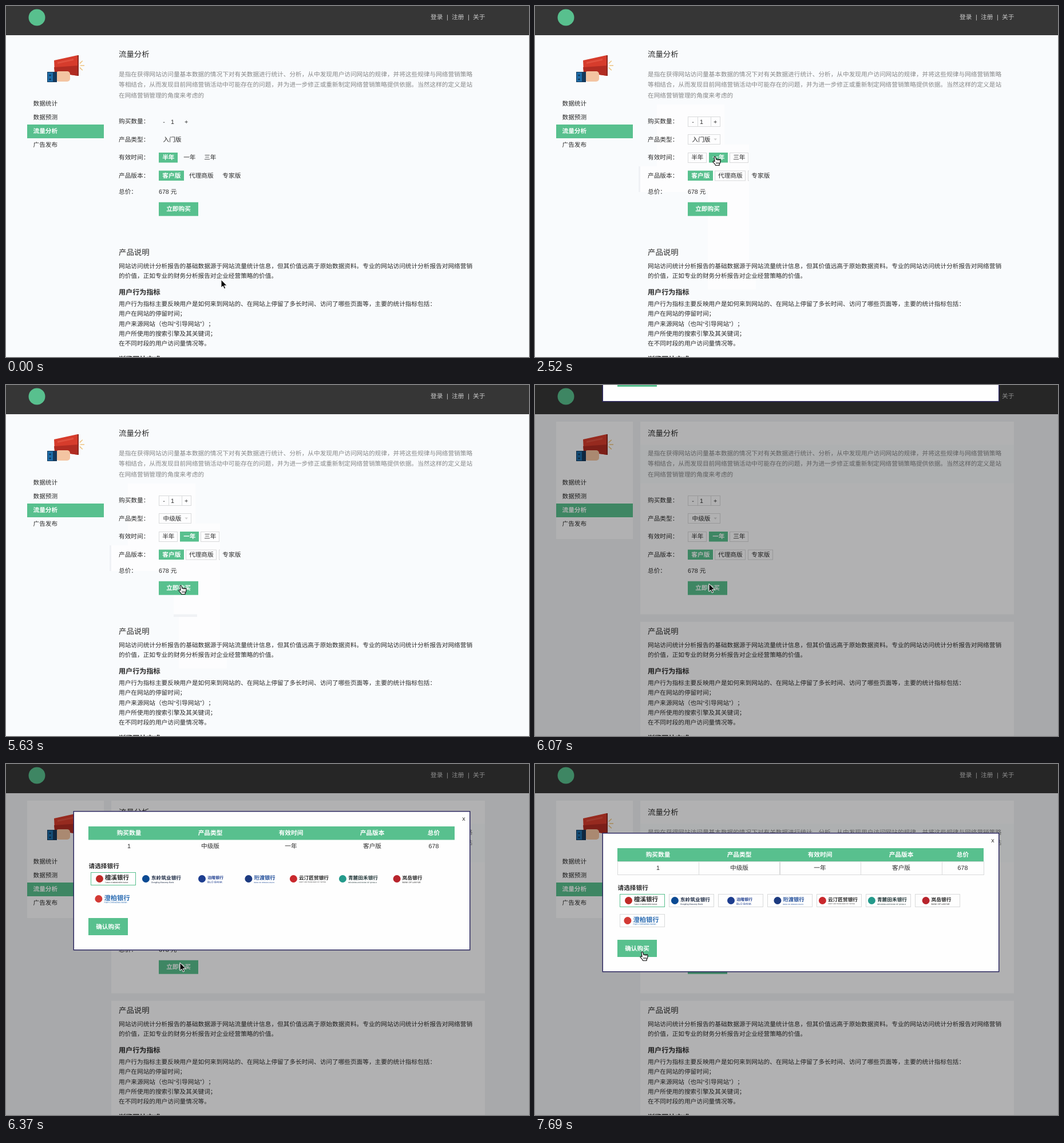
These frames come from a looping animation (914 by 613 pixels, 7.99 s). An HTML page with a canvas:

```html
<!DOCTYPE html>
<html lang="zh-CN">
<head>
<meta charset="utf-8">
<title>流量分析</title>
<style>
html, body { margin: 0; width: 100%; height: 100%; overflow: hidden; background: #f9fbfd; }
canvas { display: block; width: 914px; height: 613px; }
</style>
</head>
<body>
<canvas id="stage" width="914" height="613"></canvas>
<script>
const ctx = document.getElementById('stage').getContext('2d');
const W = 914, H = 613, LOOP = 7990, STEP = 147.9;
const FONT = '"Liberation Sans", "Noto Sans CJK SC", "Noto Sans CJK", sans-serif';
const GREEN = '#58c08e', INK = '#2b2b2b', LINE = '#d9dadb', CARD = '#fdfdfe', FLAT = '#f9fbfd';
const EM = 10.667, TITLE = 13.4, LEFT = 197, FIELD = 267;
ctx.textRendering = 'geometricPrecision';

// ---------- helpers ----------
// Sets glyphs one by one so that full-width punctuation keeps its full em.
function text(str, x, y, { size = EM, color = INK, bold = false, center = false } = {}) {
  ctx.font = `${bold ? 'bold ' : ''}${size}px ${FONT}`;
  ctx.fillStyle = color;
  const glyphs = [...str], widths = glyphs.map(g => ctx.measureText(g).width);
  if (center) x -= widths.reduce((a, b) => a + b, 0) / 2;
  glyphs.forEach((g, i) => {
    ctx.fillText(g, x, y + size * 0.38);
    x += widths[i];
  });
}

const block = (lines, y, gap, style) => lines.forEach((s, i) => text(s, LEFT, y + i * gap, style));

function rect(x, y, w, h, color) {
  ctx.fillStyle = color;
  ctx.fillRect(x, y, w, h);
}

function frame(x, y, w, h, color = LINE) {
  ctx.strokeStyle = color;
  ctx.lineWidth = 1;
  ctx.strokeRect(x + 0.5, y + 0.5, w - 1, h - 1);
}

function button(label, x, y, w, h) {
  rect(x, y, w, h, GREEN);
  text(label, x + w / 2, y + h / 2 - 0.5, { center: true, bold: true, color: '#fff' });
}

function poly(points, fill, stroke) {
  ctx.beginPath();
  points.forEach(([x, y]) => ctx.lineTo(x, y));
  ctx.closePath();
  ctx.fillStyle = fill;
  ctx.fill();
  if (stroke) { ctx.strokeStyle = stroke; ctx.lineWidth = 1; ctx.stroke(); }
}

function disc(x, y, r, color) {
  ctx.fillStyle = color;
  ctx.beginPath();
  ctx.arc(x, y, r, 0, Math.PI * 2);
  ctx.fill();
}

// ---------- page ----------
const INTRO = [
  '是指在获得网站访问量基本数据的情况下对有关数据进行统计、分析，从中发现用户访问网站的规律，并将这些规律与网络营销策略',
  '等相结合，从而发现目前网络营销活动中可能存在的问题，并为进一步修正或重新制定网络营销策略提供依据。当然这样的定义是站',
  '在网络营销管理的角度来考虑的'
];
const ABOUT = [
  '网站访问统计分析报告的基础数据源于网站流量统计信息，但其价值远高于原始数据资料。专业的网站访问统计分析报告对网络营销',
  '的价值，正如专业的财务分析报告对企业经营策略的价值。'
];
const METRICS = [
  '用户行为指标主要反映用户是如何来到网站的、在网站上停留了多长时间、访问了哪些页面等，主要的统计指标包括：',
  '用户在网站的停留时间；',
  '用户来源网站（也叫“引导网站”）；',
  '用户所使用的搜索引擎及其关键词；',
  '在不同时段的用户访问量情况等。'
];
const LABELS = ['购买数量：', '产品类型：', '有效时间：', '产品版本：'];
const MENU = ['数据统计', '数据预测', '流量分析', '广告发布'];
const YEARS = ['半年', '一年', '三年'];
const EDITIONS = ['客户版', '代理商版', '专家版'];
const TYPES = ['入门版', '中级版', '高级版'];

function megaphone() {
  poly([[84, 95], [125, 86], [126, 122], [85, 116]], '#d63c2c');
  poly([[84, 107], [126, 104], [126, 122], [85, 116]], '#b12c22');
  poly([[90, 98], [118, 92], [118, 95], [90, 101]], '#e0503f');
  rect(125, 86, 2, 36, '#8f2a22');
  ctx.strokeStyle = '#eec27c';
  ctx.lineWidth = 1.5;
  ctx.beginPath();
  for (const a of [-0.75, 0, 0.75]) {
    ctx.moveTo(125 + 5 * Math.cos(a), 104 + 5 * Math.sin(a));
    ctx.lineTo(125 + 12 * Math.cos(a), 104 + 12 * Math.sin(a));
  }
  ctx.stroke();
  ctx.fillStyle = '#f3c4a2';
  ctx.beginPath();
  ctx.roundRect(87, 114, 25, 18, 5);
  ctx.fill();
  rect(72, 115, 17, 18, '#15395c');
  rect(73, 116, 9, 16, '#1d6ca8');
  disc(77, 121, 1.6, '#123350');
  disc(77, 128, 1.6, '#123350');
}

function chips(labels, y, active, crisp) {
  let left = FIELD;
  labels.forEach((label, i) => {
    const w = Math.round(label.length * EM + 11.7), x = Math.round(left), on = i === active;
    if (on) rect(x, y, w, 17.5, GREEN);
    else if (crisp) frame(x, y, w, 18);
    text(label, x + w / 2 + 0.3, y + 8.3, { center: true, bold: on, color: on ? '#fff' : INK });
    left += label.length * EM + 15.4;
  });
}

function cards(split) {
  rect(0, 0, W, H, '#f0f2f5');
  rect(37, 64, 134, 205, CARD);
  rect(184, 64, 653, H, CARD);
  rect(184, 104, 653, 68, FLAT);
  if (split) rect(184, 400.5, 653, 13, '#f0f2f5');
}

// crisp: cards and borders show; split: the gap between the two cards shows as well
function page(year, type, crisp, split) {
  if (crisp) cards(split);
  else rect(0, 0, W, H, FLAT);
  rect(0, 0, W, 51, '#363636');
  disc(54, 20, 14.5, GREEN);
  ['登录', '注册', '关于'].forEach((s, i) => {
    text(s, 742 + i * 37, 19, { color: '#cecece' });
    if (i) text('|', 733 + i * 37, 19, { color: '#cecece' });
  });

  megaphone();
  MENU.forEach((item, i) => {
    const on = i === 2;
    if (on) rect(37, 207, 134, 24, GREEN);
    text(item, 47.5, 170.3 + i * 24, { bold: on, color: on ? '#fff' : INK });
  });

  text('流量分析', LEFT, 84, { size: TITLE });
  block(INTRO, 118.7, 18.7, { color: '#868788' });
  block(LABELS, 200.7, 31.8);
  if (crisp) {
    frame(FIELD, 193, 57, 18);
    frame(284, 193, 24, 18);
    frame(FIELD, 224, 57, 18);
    poly([[312.5, 231.5], [318, 231.5], [315.2, 234.8]], '#d0d0d0');
  }
  text('-', 276, 202, { center: true });
  text('1', 291, 202, { center: true });
  text('+', 315, 202, { center: true });
  text(TYPES[type], 274.5, 232.7);
  chips(YEARS, 256, year, crisp);
  chips(EDITIONS, 287.5, 0, crisp);
  text('总价：', LEFT, 323.5);
  text('678 元', FIELD, 323.5);
  button('立即购买', FIELD, 342.7, 69, 24);

  text('产品说明', LEFT, 430, { size: TITLE });
  block(ABOUT, 454, 17.3);
  block(['用户行为指标', '浏览网站方式'], 499, 117, { size: 12.1, bold: true });
  block(METRICS, 520, 17.35);
}

function dropdown(hover) {
  rect(FIELD, 241, 57, 54, CARD);
  TYPES.forEach((s, i) => {
    const y = 242 + i * 17.3;
    if (i === hover) rect(FIELD + 1, y, 55, 17.3, '#e3e3e3');
    text(s, 274.5, y + 8.3);
  });
  frame(FIELD, 241, 57, 54);
}

// ---------- dialog ----------
const ORDER = [['购买数量', '1'], ['产品类型', '中级版'], ['有效时间', '一年'], ['产品版本', '客户版'], ['总价', '678']];
const BANKS = [ // name, name size, caption, mark colour, ink
  ['檀溪银行', 10.5, 'TANXI COMMONERS BANK', '#bf2a26', '#222'],
  ['东岭筑业银行', 8.7, 'Dongling Masonry Bank', '#0b4a93', '#1c2a44'],
  ['泊隆银行', 7, 'BLO BANK', '#1d3d8f', '#1d3d8f'],
  ['珩渡银行', 9.3, 'BANK OF HENGDUVALES', '#1c3a80', '#1c4a98'],
  ['云汀匠贸银行', 8.7, 'CRAFT AND TRADE BANK OF YUNTING', '#c9282d', '#222'],
  ['青麓田禾银行', 8.7, 'MEADOWLAND BANK OF QINGLU', '#249a8b', '#24383a'],
  ['岚岳银行', 8.7, 'BANK OF LANYUE', '#b8242c', '#222'],
  ['澄柏银行', 11.3, 'FAIR CHENGBAI BANK', '#d33a35', '#2c6db3']
];

function bank([name, size, caption, mark, ink], i, lines) {
  const x = 148 + (i % 7) * 86, y = 107 + Math.floor(i / 7) * 35;
  const width = name.length * size, left = x + 38 - (width + 16) / 2;
  if (lines || !i) frame(x, y, 79, 23, i ? LINE : GREEN);
  disc(left + 6.5, y + 11.5, 6.5, mark);
  text(name, left + 16, y + 9.5, { size, bold: true, color: ink });
  text(caption, left + 16, y + 17.5, { size: 1.5 * width / caption.length, color: ink });
}

function dialog(top, lines) {
  ctx.save();
  ctx.translate(0, top);
  rect(117.5, 0, 694, 243.5, '#2f2a62');
  rect(119, 1.5, 691, 240.5, '#fefefe');
  text('x', 800, 12.5, { center: true });
  rect(144, 27, 640, 23.5, GREEN);
  ORDER.forEach(([head, value], i) => {
    const a = Math.round(144 + i * 141.7), b = Math.min(784, Math.round(a + 141.7)), mid = (a + b) / 2;
    text(head, mid, 38, { center: true, bold: true, color: '#fff' });
    text(value, mid, 61.3, { center: true });
    if (lines) frame(a, 50, b - a + 1, 24);
  });
  text('请选择银行', 144.5, 95.7, { bold: true });
  BANKS.forEach((b, i) => bank(b, i, lines));
  button('确认购买', 144, 187, 69, 30);
  ctx.restore();
}

// ---------- pointer ----------
const START = [376, 478];
const MOVES = [ // first step, last step, stops on the way
  [2, 10, [364, 478], [302, 242], [321, 308], [213, 154], [213, 280], [181, 308]],
  [10, 14, [184, 283], [338, 280], [310, 262]],
  [19, 24, [302, 229], [296, 237]],
  [26, 30, [293, 266]],
  [33, 38, [324, 388], [301, 349]],
  [40, 41, [304, 347]],
  [46, 52, [183, 327]]
];
const ARROW = [[0, 0], [0, 14], [3.2, 11], [5.4, 16], [7.7, 15], [5.5, 10.3], [10, 10.3]];

const legs = [];
let last = START;
for (const [from, to, ...stops] of MOVES) {
  const span = (to - from) / stops.length;
  stops.forEach((stop, i) => {
    legs.push({ start: from + i * span, span, a: last, b: stop });
    last = stop;
  });
}

function locate(k) {
  const leg = legs.filter(l => l.start <= k).pop();
  if (!leg) return START;
  const u = Math.min(1, (k - leg.start) / leg.span);
  return leg.a.map((v, i) => v + (leg.b[i] - v) * u);
}

function hand() {
  ctx.beginPath();
  ctx.moveTo(4, 9.5);
  ctx.lineTo(3, 2);
  ctx.quadraticCurveTo(4.2, 0, 5.6, 2);
  ctx.lineTo(6.8, 6.2);
  for (const x of [9.2, 11.6, 14]) ctx.quadraticCurveTo(x - 1, 4.8, x, 7);
  ctx.quadraticCurveTo(14.4, 11.5, 12.2, 14);
  ctx.lineTo(12, 16.5);
  ctx.lineTo(5.8, 16.5);
  ctx.quadraticCurveTo(4.2, 13.5, 1, 10.4);
  ctx.quadraticCurveTo(1, 8, 4, 9.5);
  ctx.closePath();
  ctx.fillStyle = '#fff';
  ctx.fill();
  ctx.strokeStyle = '#111';
  ctx.lineWidth = 1.2;
  ctx.stroke();
  for (const x of [7, 9, 11]) rect(x - 0.4, 10.5, 0.8, 3.5, '#111');
}

function pointer(k) {
  ctx.save();
  ctx.translate(...locate(k));
  if ((k >= 14 && k < 34) || (k >= 37 && k < 41) || k >= 50) hand();
  else poly(ARROW, '#0a0a0a', '#fff');
  ctx.restore();
}

// ---------- timeline ----------
// Repaints the boxes swept by the pointer with the crisp page.
function reveal(swept, year, type, split) {
  ctx.save();
  ctx.beginPath();
  for (const { a, b } of swept) {
    const x = Math.min(a[0], b[0]), y = Math.min(a[1], b[1]);
    ctx.rect(x, y, Math.abs(a[0] - b[0]) + 10, Math.abs(a[1] - b[1]) + 17);
  }
  ctx.clip();
  page(year, type, true, split);
  ctx.restore();
}

function draw(k) {
  const year = k < 17 ? 0 : 1, type = k < 32 ? 0 : 1;
  if (k < 41) {
    page(year, type, false);
    const swept = legs.filter(l => l.start < k);
    reveal(swept.filter(l => l.start < 33), year, type, false);
    reveal(swept.filter(l => l.start >= 33), year, type, true);
    if (k >= 24 && k < 32) dropdown(k < 27 ? -1 : k < 29 ? 0 : 1);
  } else {
    page(year, type, true, true);
    rect(0, 0, W, H, 'rgba(0,0,0,0.3)');
    const u = Math.min(1, 0.043 + 0.2465 * (k - 41));
    dialog(Math.round(120 - 381 * (1 - u) ** 3), k >= 45);
  }
  pointer(k);
}

let shown = -1;
function tick() {
  const k = Math.floor((performance.now() % LOOP + 4) / STEP);
  if (k !== shown) draw(shown = k);
  requestAnimationFrame(tick);
}
tick();
</script>
</body>
</html>
```
